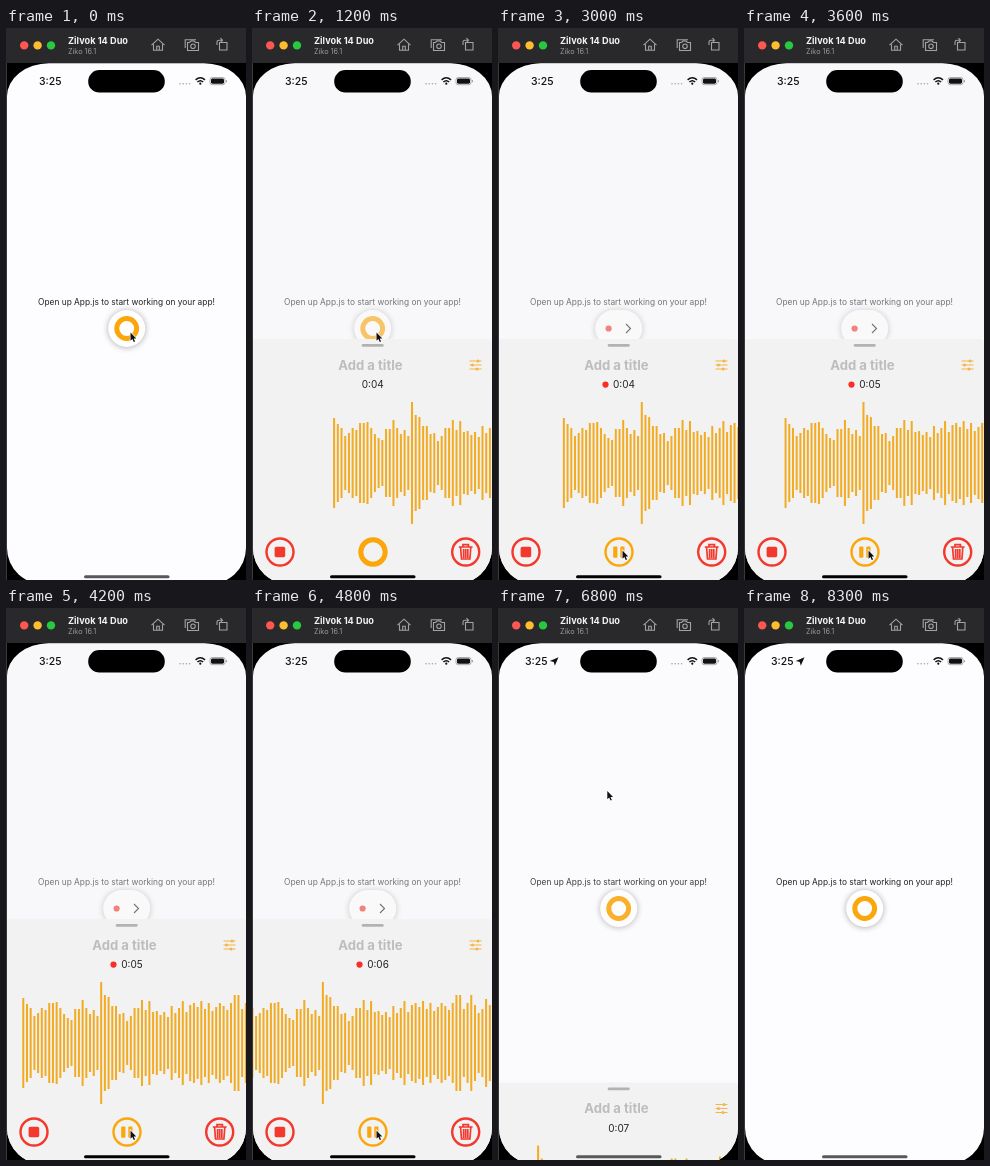
Animation of 240x552 px, one loop 8.4 s. Source, as an HTML page with a canvas:

```html
<!DOCTYPE html>
<html lang="en">
<head>
<meta charset="utf-8">
<title>Voice recorder</title>
<style>
html, body { margin: 0; width: 100%; height: 100%; overflow: hidden; background: #000; }
canvas { display: block; width: 240px; height: 552px; }
</style>
</head>
<body>
<canvas></canvas>
<script>
const LOOP = 8400, ORANGE = '#fba60b', RED = '#f3382e', PANEL = '#f1f2f1';
const SCROLL_SPEED = 0.0405, PITCH = 3.71;
const REC_START = 2600, REC_END = 5560, OPEN = 500, CLOSE = 6612;

// Half heights of the recorded bars
const LEVELS = [45, 39, 35, 27, 30, 35, 33, 40, 40, 41, 35, 29, 25, 23, 34, 34, 43, 35, 29, 33, 27, 61, 48, 46, 37, 37,
  29, 30, 22, 27, 35, 35, 43, 33, 42, 31, 32, 28, 31, 26, 37, 30, 35, 42, 31, 38, 40, 36, 42, 34, 40, 32, 36,
  40, 37, 33, 40, 48, 48, 34, 40, 48, 38, 30, 34, 44, 38, 43, 36, 42, 50, 46, 51, 40, 34];

const canvas = document.querySelector('canvas');
const ctx = canvas.getContext('2d');
const ratio = window.devicePixelRatio || 1;
canvas.width = 240 * ratio;
canvas.height = 552 * ratio;

const clamp = v => Math.min(1, Math.max(0, v));
const mix = (a, b, p) => a + (b - a) * p;
const span = (t, start, length) => clamp((t - start) / length);
const easeOut = p => 1 - (1 - p) ** 3;
const easeInOut = p => p * p * (3 - 2 * p);

function rounded(x, y, w, h, r, color) {
  ctx.beginPath();
  ctx.roundRect(x, y, w, h, r);
  ctx.fillStyle = color;
  ctx.fill();
}

function disc(x, y, r, color) {
  ctx.beginPath();
  ctx.arc(x, y, r, 0, 7);
  ctx.fillStyle = color;
  ctx.fill();
}

// Ring with a fixed outer radius
function ring(x, y, outer, width, color) {
  ctx.beginPath();
  ctx.arc(x, y, outer - width / 2, 0, Math.PI * 2);
  ctx.lineWidth = width;
  ctx.strokeStyle = color;
  ctx.stroke();
}

function stroke(path, color, width = 1) {
  ctx.strokeStyle = color;
  ctx.lineWidth = width;
  ctx.stroke(new Path2D(path));
}

function fill(path, color) {
  ctx.fillStyle = color;
  ctx.fill(new Path2D(path));
}

function text(str, x, y, size, color, weight = 400, align = 'center') {
  ctx.font = `${weight} ${size}px Inter, sans-serif`;
  ctx.textAlign = align;
  ctx.textBaseline = 'alphabetic';
  ctx.fillStyle = color;
  ctx.fillText(str, x, y);
}

function faded(alpha, draw) {
  if (alpha <= 0) return;
  ctx.save();
  ctx.globalAlpha *= alpha;
  draw();
  ctx.restore();
}

function titleBar() {
  rounded(0, 0, 240, 36, 0, '#29282b');
  ['#fe5650', '#fdbd2e', '#28c840'].forEach((c, i) => disc(18.2 + i * 13.4, 17.4, 4.2, c));
  text('Zilvok 14 Duo', 62, 16.3, 9.2, '#f2f2f3', 700, 'left');
  text('Ziko 16.1', 62, 25.5, 7.3, '#99989c', 400, 'left');
  const gray = '#a3a2a6';
  stroke('M145.5 17.2L152 11.2L158.5 17.2M147.5 16.2V22.2H156.5V16.2M150.7 21.7V18.2H153.3V21.7', gray, 1.1);
  stroke('M181.5 14.5H183.5L185 13H188L189.5 14.5H192.5V22.5H181.5ZM179.2 20V11.8H190', gray, 1.1);
  ring(187, 18.3, 2.8, 1.1, gray);
  stroke('M213.5 14.5H221V22H213.5ZM211 17V14Q211 12.3 213 12.3H216M214.5 10L216.5 12.3L214.5 14.5', gray, 1.1);
}

function statusBar(t) {
  const shift = easeInOut(span(t, 5700, 200));
  text('3:25', 33 - 6 * shift, 56.9, 10.5, '#111', 500, 'left');
  faded(shift, () => fill('M60.5 49.2L56.8 57.7L55.8 53.9L51.8 52.9Z', '#111'));
  rounded(82.2, 42.1, 76.6, 22.5, 11.2, '#000');
  for (let i = 0; i < 4; i++) disc(174 + i * 3.2, 55.7, 0.8, '#a5a5a8');
  stroke('M189.6 51.9Q194.3 47.7 199 51.9M191.4 54Q194.3 51.4 197.2 54', '#111', 1.5);
  disc(194.3, 55.7, 1.1, '#111');
  ctx.beginPath();
  ctx.roundRect(204, 49.5, 15, 7.2, 2.2);
  ctx.lineWidth = 0.7;
  ctx.strokeStyle = '#8b8b8e';
  ctx.stroke();
  rounded(205, 50.5, 13, 5.2, 1.4, '#111');
  rounded(219.9, 51.9, 0.9, 2.4, 0.4, '#8b8b8e');
}

function floatingButton(active) {
  const w = mix(37, 47, active);
  ctx.save();
  ctx.shadowColor = 'rgba(0,0,0,.32)';
  ctx.shadowBlur = 6 * ratio;
  ctx.shadowOffsetY = 0.4 * ratio;
  rounded(120.7 - w / 2, 282, w, 37, 18.5, '#fff');
  ctx.restore();
  faded(1 - active, () => ring(120.7, 300.5, 12.4, 5, ORANGE));
  faded(active, () => {
    disc(110.6, 300.5, 3.1, RED);
    stroke('M128 296L132.5 300.5L128 305', '#222', 1.1);
  });
}

function waveform(scroll) {
  ctx.fillStyle = '#f2ab22';
  LEVELS.forEach((h, i) => {
    const x = 81.1 - scroll + i * PITCH;
    if (x < 241) ctx.fillRect(x, 435 - h, 2, h * 2);
  });
}

function slidersIcon() {
  [[333, 226], [337, 220.5], [341, 225]].forEach(([y, knob]) => {
    stroke(`M217.5 ${y}H229.5`, '#f7b547', 1.1);
    disc(knob, y, 1.5, '#f7b547');
  });
}

function controls(active) {
  ring(28, 524, 14.7, 2.4, RED);
  rounded(22.6, 518.8, 10.6, 10.4, 1.6, RED);
  ring(121, 524, 14.7, mix(5, 2.4, active), ORANGE);
  faded(active, () => {
    rounded(115.2, 518.5, 4.2, 11.2, 1, ORANGE);
    rounded(122.3, 518.5, 4.2, 11.2, 1, ORANGE);
  });
  ring(213.7, 524, 14.7, 2.4, RED);
  stroke('M206.8 519H220.6M211 518.5V516.6H216.4V518.5M208.6 519.5L209.5 531H217.9L218.8 519.5M211.6 521V530M213.7 521V530M215.8 521V530', RED, 1.7);
}

function sheet(t, shown, active) {
  const elapsed = clamp((t - REC_START) / (REC_END - REC_START)) * (REC_END - REC_START);
  ctx.save();
  ctx.translate(0, 241 * (1 - shown));
  rounded(0, 311, 240, 250, [4, 4, 0, 0], PANEL);
  rounded(109.7, 315.9, 22, 2.9, 1.4, '#b2b2b3');
  text('Add a title', 118.4, 341.8, 13.1, '#bdbdbe', 700);
  slidersIcon();
  faded(active, () => disc(107.5, 356.6, 3.1, '#fb2d25'));
  text('0:0' + Math.floor((elapsed + 4100) / 1000), mix(120.7, 126, active), 360.3, 10, '#222');
  waveform(elapsed * SCROLL_SPEED);
  controls(active);
  ctx.restore();
}

function pointer(t) {
  const down = easeInOut(span(t, 1350, 750));
  const up = easeInOut(span(t, 5700, 750));
  const exit = easeInOut(span(t, 7350, 350));
  if (exit === 1) return;
  const x = mix(mix(124.5, 109.3, up), 208, exit);
  const y = mix(mix(mix(304.5, 522.5, down), 183, up), -14, exit);
  ctx.save();
  ctx.translate(x, y);
  ctx.scale(0.85, 0.85);
  const arrow = 'M0 0V9.6L2.2 7.6L3.8 11.2L5.4 10.5L3.8 7.1H6.8Z';
  stroke(arrow, '#fff', 1.6);
  fill(arrow, '#111');
  ctx.restore();
}

function draw(t) {
  const shown = t < CLOSE
    ? easeOut(span(t, OPEN, 600))
    : 1 - easeOut(span(t, CLOSE, 600));
  const active = easeInOut(span(t, REC_START - 100, 250)) - easeInOut(span(t, REC_END, 250));

  ctx.setTransform(ratio, 0, 0, ratio, 0, 0);
  rounded(0, 0, 240, 552, 0, '#000');
  titleBar();
  rounded(0, 35, 1, 517, 0, '#39393d');
  rounded(1, 35, 239, 517, 0, '#000');

  ctx.save();
  ctx.beginPath();
  const top = { x: 42, y: 33 }, bottom = { x: 39, y: 37 };
  ctx.roundRect(1, 35.3, 239, 521.7, [top, top, bottom, bottom]);
  ctx.clip();
  rounded(0, 35, 240, 520, 0, '#fdfcfe');
  text('Open up App.js to start working on your app!', 120.5, 277, 8.35, '#222');
  floatingButton(active);
  faded(0.4 * shown, () => rounded(0, 35, 240, 520, 0, '#f0f0f2'));
  if (shown > 0) sheet(t, shown, active);
  statusBar(t);
  const dark = span(t, OPEN, 300) - span(t, 5700, 300);
  const tone = Math.round(mix(88, 0, dark));
  rounded(78, 547.2, 85.5, 3, 1.5, `rgb(${tone},${tone},${tone})`);
  ctx.restore();

  pointer(t);
}

function frame() {
  draw(performance.now() % LOOP);
  requestAnimationFrame(frame);
}
frame();
</script>
</body>
</html>
```
